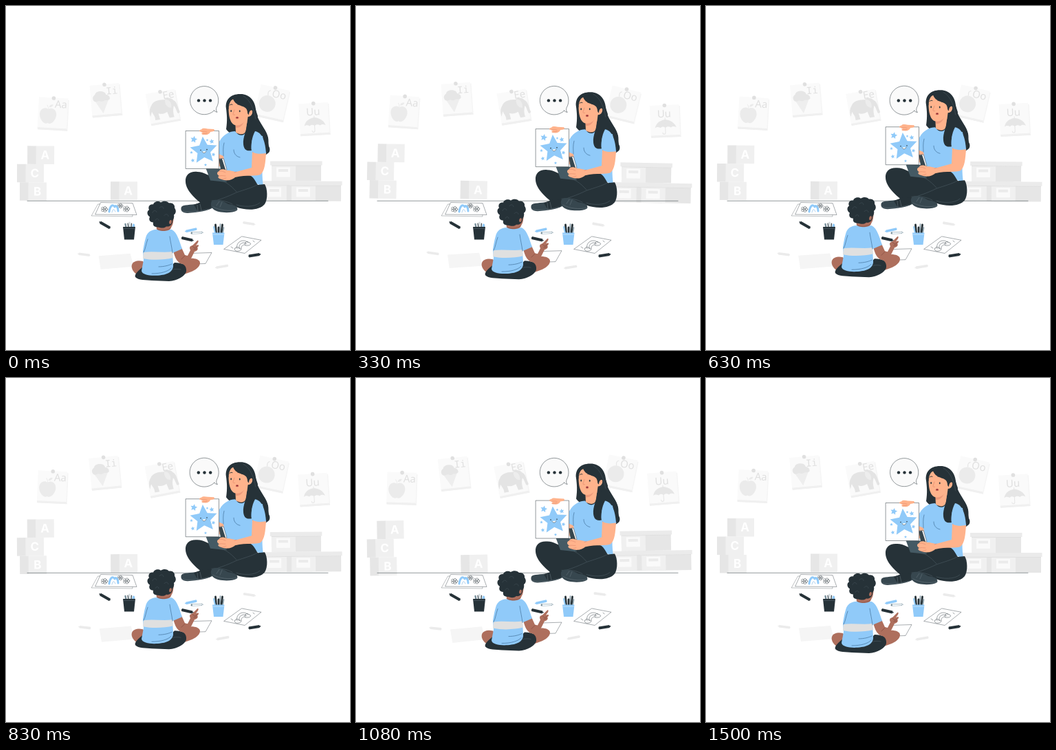
Write an HTML page with a canvas that moves like this. It is 500 by 500 pixels and loops after 1.54 s.

```html
<!DOCTYPE html>
<html lang="en">
<head>
<meta charset="utf-8">
<style>
html, body { margin: 0; width: 100%; height: 100%; overflow: hidden; background: #fff; }
canvas { display: block; width: 500px; height: 500px; }
</style>
</head>
<body>
<canvas id="stage" width="500" height="500"></canvas>
<script>
const ctx = document.getElementById('stage').getContext('2d');
const LOOP = 1540, LEAD = 40;
const DARK = '#263238', SLATE = '#37474f', BLUE = '#90caf9', SKIN = '#ffb38c', SKIN_LINE = '#e58f70';
const BROWN = '#ae6f5d', BROWN_LINE = '#834b40', G1 = '#fafafa', G2 = '#f0f0f0', G3 = '#e6e6e6', ICON = '#ebebeb';
ctx.lineCap = ctx.lineJoin = 'round';

const cache = {};
const path = d => cache[d] || (cache[d] = new Path2D(d));

function fill(color, ...shapes) {
  ctx.fillStyle = color;
  shapes.forEach(d => ctx.fill(path(d)));
}

function line(color, width, ...shapes) {
  ctx.strokeStyle = color;
  ctx.lineWidth = width;
  shapes.forEach(d => ctx.stroke(path(d)));
}

function sheet(d, color = '#fff', width = 0.5) {
  fill(color, d);
  line(DARK, width, d);
}

function rect(color, x, y, w, h) {
  ctx.fillStyle = color;
  ctx.fillRect(x, y, w, h);
}

function dot(color, x, y, rx, ry = rx, turn = 0) {
  ctx.fillStyle = color;
  ctx.beginPath();
  ctx.ellipse(x, y, rx, ry, turn, 0, 7);
  ctx.fill();
}

function label(text, x, y, font, color) {
  ctx.font = font;
  ctx.fillStyle = color;
  ctx.textAlign = 'center';
  ctx.textBaseline = 'middle';
  ctx.fillText(text, x, y);
}

function at(x, y, turn, draw) {
  ctx.save();
  ctx.translate(x, y);
  ctx.rotate(turn);
  draw();
  ctx.restore();
}

function star(x, y, r, turn = 0) {
  ctx.fillStyle = BLUE;
  ctx.beginPath();
  for (let i = 0; i < 10; i++) {
    const a = turn - Math.PI / 2 + i * Math.PI / 5, q = i % 2 ? r * 0.48 : r;
    ctx.lineTo(x + q * Math.cos(a), y + q * Math.sin(a));
  }
  ctx.fill();
}

function crayon(color, x1, y1, x2, y2, width = 4) {
  ctx.lineCap = 'butt';
  line(color, width, `M${x1} ${y1}L${x2} ${y2}`);
  ctx.lineCap = 'round';
  line(color, width * 0.4, `M${x1 - (x2 - x1) * 0.06} ${y1 - (y2 - y1) * 0.06}L${x2} ${y2}`);
}

// Wall cards
function card(x, y, turn, text, tx, ty, icon, font = '15px "Noto Sans", sans-serif') {
  at(x, y, turn, () => {
    rect('#f5f5f5', -21, -20, 43.5, 45);
    rect(G1, -21.5, -22, 42.5, 44);
    fill(G2, 'M-21.5 22L21 22L22.5 25L-21 25Z');
    dot('#e0e0e0', 0, -21.5, 2.8);
    icon();
    label(text, tx, ty, font, '#e0e0e0');
  });
}

const apple = () => {
  fill(ICON, 'M-7 -5C-12 -9 -20 -5 -19 4C-18 12 -11 18 -7 15C-2 18 4 11 5 4C6 -5 -2 -9 -7 -5Z',
    'M-6 -8C-6 -11 -3 -13 0 -12C-1 -9 -3 -8 -6 -8Z');
  line(ICON, 1, 'M-7 -5C-7 -8 -8 -10 -9 -11');
};

const iceCream = () => {
  fill('#eeeeee', 'M-17 -1L5 -1L-5 20Z');
  fill(G3, 'M-18 0C-20 -5 -16 -7 -15 -8C-14 -14 0 -14 1 -7C5 -6 7 -3 6 0C2 3 0 0 -3 2C-7 4 -9 0 -12 2C-15 3 -17 2 -18 0Z');
};

const elephant = () => {
  fill('#e4e4e4', 'M-16 -4C-13 -10 -3 -11 4 -9C8 -12 14 -11 17 -6C22 -3 21 6 23 11C24 14 19 15 19 11C18 8 18 4 16 2C14 7 13 11 14 18L7 18L5 9C0 11 -4 11 -8 9L-7 18L-14 18C-13 12 -16 9 -17 5L-20 12C-21 4 -19 -1 -16 -4Z');
  fill('#ededed', 'M5 -9C11 -9 14 -3 12 4C7 4 3 -2 5 -9Z');
};

const orange = () => {
  dot(ICON, -6.5, 3.5, 12);
  line(G3, 1.2, 'M-8 -9C-9 -12 -9 -15 -6 -16');
};

const umbrella = () => {
  fill(G3, 'M-15 11C-13 3 -7 0 0 -1C7 0 14 4 16 11C13 9 10 9 8 11C5 9 3 9 0 11C-3 9 -5 9 -7 11C-10 9 -13 9 -15 11Z');
  line(G3, 1, 'M0 -3L0 18C0 21 -4 21 -4 18');
};

function block(x, y, letter) {
  rect(G3, x, y, 13, 26.5);
  rect(G2, x + 12.5, y, 26.5, 26.5);
  label(letter, x + 25.7, y + 14, 'bold 17px Inter, sans-serif', '#fff');
}

function box(x, y) {
  rect(G3, x + 2, y + 5, 72, 24);
  rect(G2, x + 2, y + 6, 35, 23);
  rect('#e0e0e0', x + 2, y + 6, 72, 1);
  rect(ICON, x, y, 75.5, 6);
  rect(G1, x + 9, y + 9, 20, 14);
  rect(ICON, x + 12, y + 11.5, 14, 4);
}

function backdrop() {
  card(68, 156, 0.05, 'Aa', 11, -12, apple);
  card(144.5, 136, -0.09, 'Ii', 10, -10.5, iceCream, '14px "DejaVu Sans Mono", monospace');
  card(227.5, 146, -0.18, 'Ee', 11, -14.5, elephant);
  card(386.5, 139.5, 0.22, 'Oo', 7.5, -12, orange);
  card(447.7, 162.5, -0.06, 'Uu', -1, -8.5, umbrella);
  block(31, 204, 'A');
  block(16, 230.5, 'C');
  block(20, 257, 'B');
  block(152, 255.5, 'A');
  box(384, 225);
  box(371, 254);
  box(413, 254);
  crayon(ICON, 106, 360.7, 122, 362.7, 3.6);
  crayon(ICON, 306, 380, 323, 377, 3.6);
  crayon(ICON, 361, 317, 345, 314.5, 3.6);
  fill('#f5f5f5', 'M135 363.5L181 360L186 379L138 383Z');
}

function flower(x, y, r) {
  for (let i = 0; i < 5; i++) {
    const a = i * Math.PI * 0.4;
    ctx.beginPath();
    ctx.arc(x + r * Math.cos(a), y + r * 0.8 * Math.sin(a), r * 0.6, 0, 7);
    ctx.stroke();
  }
}

function drawings() {
  line(DARK, 0.5, 'M31 283.3H468');
  sheet('M134 288L183 290L184 306L124.5 305Z', '#fff', 0.3);
  sheet('M138 285.5L184 286.5L190 303.5L130 303Z', '#fff', 0.4);
  ctx.strokeStyle = DARK;
  ctx.lineWidth = 0.45;
  flower(143, 295.5, 3);
  flower(166, 290.5, 2.5);
  flower(175, 295, 3);
  line(BLUE, 3, 'M150 299C151 291 155 287 158 292C160 288 163 293 163 298');
  line('#5d9fdd', 0.5, 'M154 300C155 295 157 294 159 299');
  sheet('M343 335L371 340.3L347 359.5L317 353.5Z', '#fff', 0.4);
  line(DARK, 0.45, 'M336 353C333 343 345 337 352 344', 'M339 353C337 346 345 341 350 346', 'M342 353C341 349 346 345 348 348',
    'M333 352C335 349 338 351 339 352C343 352 342 356 338 356C334 357 331 355 333 352Z',
    'M348 344C350 341 353 343 353 344C357 344 356 348 352 348C348 349 346 347 348 344Z',
    'M327 350L330 352M359 341L361 343');
}

function supplies() {
  crayon(DARK, 137, 314.5, 151, 322.5);
  crayon(DARK, 368.5, 361, 353, 363.5);
  crayon(DARK, 271, 340.5, 255.5, 337);
  crayon(BLUE, 261.5, 327.5, 277, 324, 3.4);
  crayon('#78909c', 285, 329.3, 269, 330, 3.2);
  crayon('#f0f5f8', 284.5, 329.4, 271, 330, 2.4);

  line('#78909c', 2.4, 'M173.5 317L175 324M186 319L184 326');
  line('#d9dfe2', 3, 'M179.5 315L180 324');
  line(BLUE, 3, 'M185.5 318L184 324');
  line(SLATE, 1.2, 'M177 316L178 322M182.5 316L182 323');
  fill(DARK, 'M170 321L188 321L186 339.5L172 339.5Z');
  line('#55646c', 0.6, 'M171 323.5H187');

  line(DARK, 2.8, 'M304.5 318L305.5 330M309 322L309 330M314.5 318L313 330');
  line(BLUE, 2, 'M302 321L304 330');
  line('#78909c', 1.4, 'M311.5 317L311 329M316.5 322L315 330');
  fill(BLUE, 'M300 329.5L317.5 329.5L315.5 347L302 347Z');
  line('#d4eafc', 0.7, 'M301 332H316.5');
}

function bubble(grow) {
  ctx.save();
  ctx.translate(289, 138);
  ctx.scale(1 + grow, 1 + grow);
  ctx.translate(-289, -138);
  sheet('M302.5 152A20.6 20.6 0 1 1 306 147.5C305.3 150 305 152 307 154.3C305.3 154 303.5 153.5 302.5 152Z', G1);
  [280, 288.5, 297].forEach(x => dot(DARK, x, 137.4, 2.2));
  ctx.restore();
}

function womanHead() {
  fill(DARK, 'M320 149C318 136 327 127.5 341 128C354 128 362 138 363 150C364 166 376 175 380 189C381 197 381 202 383 208C383 214 378 217 373 217L345 205C344 190 325 188 320 179C322 166 321 158 320 149Z');
  fill(SKIN, 'M333 164L352 158L349 181C347 187 342 188 334 184Z');
  fill('#ed9a7b', 'M334 172C339 172 344 170 347 166C344 174 340 177 334 177Z');
  fill(SKIN, 'M323.5 148C323 139 328 134 336 135C347 135 353 142 353.5 150C358 148 360 153 357 158C355 161 352 161 351 161C348 169 341 174 335 173.5C326 173 323.5 160 323.5 148Z');
  fill(DARK, 'M330 135C334 146 345 144 349 149C352 153 350 157 353 158C353 152 358 149 358.5 154C358 163 351 164 352 171C352 181 344 189 345 202C347 213 354 211 359 211C358 205 356 196 360 187L366 160L359 139L345 131Z',
    'M331 134C326 137 323.5 143 323.5 150L320 150C320 139 324 134 331 134Z');
  dot(DARK, 327.2, 152.5, 0.9, 1.5);
  dot(DARK, 339.7, 152.7, 0.9, 1.5);
  line(DARK, 0.9, 'M324.8 144.5C326 143 327.5 142.7 329 143.3', 'M337 143.2C339 142 341.5 143 342.8 145.3');
  line(SKIN_LINE, 0.8, 'M332 151C331.5 154 329.8 156 330 157.5C330.5 158.6 331.5 158.5 332.5 158.2', 'M354.5 156C355 153.5 356.5 153 357.3 153.5');
  dot('#c95f55', 336, 162.4, 2.2, 1.7);
  dot('#7b2f35', 336, 162.3, 1.2, 0.8);
  line('#56636a', 0.4, 'M345 131C356 137 361 152 363 166C365 177 375 184 376 199', 'M351 183C349 192 350 199 352 205');
}

function woman() {
  fill(SKIN, 'M308 211L317 211L320 233L309 233Z');
  womanHead();
  fill(BLUE, 'M333 182C326 182 316 186 310 197L309 215L316 218C318 227 318 237 319 243L345 251L374 262C372 249 372 235 374 216L381 213C379 198 374 184 364 180L350 180C348 189 339 191 333 182Z');
  line('#37638b', 0.6, 'M357 197C356 205 359 211 360 218', 'M331 209C331 215 335 219 340 220', 'M317 199C315 206 316 212 316 218');
  // Hair tail over the shoulder
  fill(DARK, 'M350 171C350 182 344 190 345 201C346 210 351 211 357 210C356 203 357 194 361 187L373 189L376 212C380 217 385 212 383 206C380 201 383 196 380 188C377 177 367 172 365 163Z');
  fill(BLUE, 'M357 211C356 202 357 191 362 182C374 184 377 201 378 214L371 220Z');

  // Crossed legs and shoes
  fill(DARK, 'M261 256C260 246 267 240 278 241C288 241 295 247 307 252L320 253C330 245 346 242 356 247C361 250 363 256 366 260L376 259C380 265 381 281 376 288C369 297 350 298 334 292L309 287L290 292C276 281 262 269 261 256Z');
  line('#53626a', 0.5, 'M308 253C318 254 326 260 335 270', 'M290 288C308 282 321 278 335 271C347 267 358 264 365 260', 'M299 283C310 282 320 283 329 288', 'M369 286C361 293 344 292 335 289');
  fill(SLATE, 'M255 292C258 288 268 290 279 287C287 284 296 287 301 293C293 298 279 300 264 301C256 301 253 297 255 292Z');
  fill(DARK, 'M273 289L289 283L304 286L296 295L279 299Z');
  fill(SLATE, 'M300 283C307 280 315 283 323 288C333 289 338 292 336 297C328 302 307 301 301 295C297 291 297 286 300 283Z');
  line('#6a7980', 0.5, 'M256 298C266 301 285 298 295 295', 'M301 292C310 297 325 299 336 296', 'M278 289L279 298M282 288L284 297', 'M310 284L306 290M314 285L311 292');

  // Notebook, forearm and hand
  sheet('M310 222L316 221.5L321 238L314 239Z');
  fill(SLATE, 'M309.5 222.5L314 222L319.5 239L312 238Z');
  fill('#455a64', 'M290.5 236L315 237L321 256L297 253.5Z');
  line(DARK, 0.6, 'M292 236L314.5 237.3L320 255');
  fill(SKIN, 'M358 212C365 216 372 215 378 214C377 228 376 240 370 245C364 248 350 245 333 249C329 253 320 255 314 252C308 251 307 248 310 247C306 245 306 241 310 240C310 237 315 236 322 239C328 239 331 241 335 241L357 235Z');
  line(SKIN_LINE, 0.7, 'M310 240C313 239 316 241 319 242', 'M310 247C313 246 316 247 319 247', 'M314 252L320 250', 'M335 241L332 242');

  // Star picture
  sheet('M261.5 181.5H309.5V236.5H261.5Z');
  star(287.5, 210.3, 20.5, -0.08);
  star(273, 194, 5.2, 0.2);
  star(299, 197, 3.7, -0.2);
  star(292.5, 195, 2);
  star(269.5, 213, 2.3);
  star(301.5, 216, 3, 0.3);
  star(271.5, 224.5, 3, -0.2);
  star(290, 231, 2.2);
  dot(DARK, 283, 209.5, 0.8);
  dot(DARK, 292, 208.7, 0.8);
  fill('#fff', 'M285 211.5L291 211C290 214.5 286 214.5 285 211.5Z');
  line(DARK, 0.5, 'M285 211.5C286 214.5 290 214.5 291 211');
  fill(SKIN, 'M284 183C280 183 280 180 284 179.5C286 177 290 178 293 178.5L302 179C304 180 303 182 300 182.5L297 183C296 186 292 188 288 187C284 187 283 185 286 184Z');
  line(SKIN_LINE, 0.6, 'M284 183C287 182 290 182 292 183', 'M286 186L292 185');
}

function boy() {
  sheet('M268 359.5L299 358.5L290 374.5L255 375.5Z', '#fff', 0.4);
  fill(BROWN, 'M199 371C187 368 181 374 183 381C185 388 191 391 199 394L209 385Z',
    'M257 370C265 365 281 366 282 373C282 382 269 387 258 390Z');
  fill(DARK, 'M199 379C193 384 186 390 188 394C192 399 204 398 212 399L237 400C249 399 260 393 262 386C263 376 256 373 245 373L237 381Z');
  line('#56656c', 0.5, 'M236 385C243 382 250 382 254 383');

  // Pointing arm
  fill(BROWN, 'M243 356L255 351L260 362L264 363L268 355C266 351 267 349 271 348L278 341C280 340 280 342 279 344L276 348C281 346 281 349 278 351C280 353 278 356 274 357L269 367C265 374 259 377 253 374C247 370 245 363 243 356Z');
  line(BROWN_LINE, 0.7, 'M271 349L274 352L278 350', 'M273 354L277 353', 'M255 368L260 363');

  // Shirt with stripe
  fill(BLUE, 'M216 325C208 327 205 330 203 337C201 344 200 350 199 356L200 369L197 385C198 392 215 393 226 391C237 390 244 384 243 376L242 359L256 353C252 342 249 329 241 325Z');
  fill('#e0e0e0', 'M200 358C213 356 229 359 242 357L243 366C231 369 213 370 199 367Z');
  line('#37638b', 0.6, 'M206 339C203 347 203 353 200 358', 'M238 335C239 343 241 350 242 359', 'M222 379C230 379 237 377 241 375', 'M212 389C225 389 236 386 240 381');

  // Head
  fill(BROWN, 'M218 312L219 324C222 328 236 328 239 324L241 320C244 316 244 304 243 299L230 299Z');
  line(BROWN_LINE, 0.7, 'M219 324C224 327 233 327 239 323');
  at(1, 0.5, 0, () => {
    fill(DARK, 'M208 306C203 303 204 297 207 296C205 291 208 287 213 288C214 284 220 282 224 285C228 282 234 283 236 286C241 285 245 289 244 293C247 297 246 301 243 303C244 307 242 310 241 312C241 317 237 321 232 320C227 324 222 321 220 321C215 321 212 319 213 314C208 314 206 310 208 306Z');
    line('#47555c', 0.5, 'M212 300C213 296 217 296 218 299', 'M222 293C224 290 228 291 228 294', 'M229 304C231 301 235 302 235 305', 'M216 311C217 308 221 308 221 311');
  });
  dot(BROWN, 239, 314, 1.8, 3, 0.2);
}

function render(now) {
  const phase = (now % LOOP + LEAD) / LOOP * 2 * Math.PI;
  const lift = (1 - Math.cos(phase)) / 2;
  const sway = Math.sin(phase) * Math.PI / 180;
  const float = draw => at(0, -6 * lift, 0, draw);

  rect('#fff', 0, 0, 500, 500);
  at(250, 250, sway, () => {
    ctx.translate(-250, -250);
    backdrop();
  });
  drawings();
  bubble(0.022 * lift);
  float(woman);
  supplies();
  float(boy);
}

const start = performance.now();
function tick() {
  render(performance.now() - start);
  requestAnimationFrame(tick);
}
tick();
</script>
</body>
</html>
```
